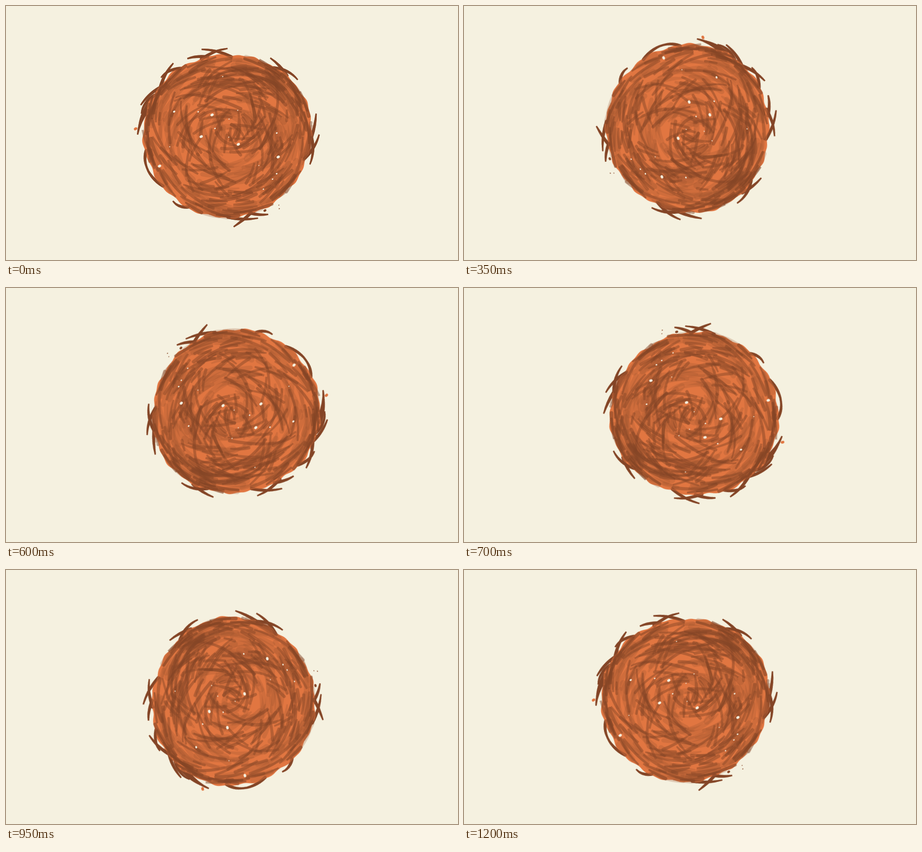
An HTML page with a canvas for the animation above (1.25 s loop, 998x561 px).

```html
<!DOCTYPE html>
<html lang="en">
<head>
<meta charset="utf-8">
<title>Rolling ball</title>
<style>
  html, body { margin: 0; width: 100%; height: 100%; overflow: hidden; background: #f5f1e0; }
  canvas { display: block; width: 998px; height: 561px; }
</style>
</head>
<body>
<canvas id="stage" width="998" height="561"></canvas>
<script>
const W = 998, H = 561, STEP = 50, STEPS = 25;
const PAPER = '#f5f1e0', ORANGE = '#e17641', BROWN = '#854627';
const { PI, sin, cos, sqrt, min, max, floor } = Math;

const stage = document.getElementById('stage').getContext('2d');
const ball = document.createElement('canvas');
ball.width = W;
ball.height = H;
const ctx = ball.getContext('2d');
ctx.translate(W / 2, H / 2);

let seed = 4127;
const rnd = () => (seed = (seed * 1664525 + 1013904223) % 4294967296) / 4294967296;
const between = (a, b) => a + (b - a) * rnd();
const polar = (r, a) => [r * cos(a), r * sin(a)];
const rad = deg => deg * PI / 180;

// Lumpy outline: a few low waves for the shape, two high ones for the ragged edge
const rim = a => 183 + 11 * cos(a - 2.69) + 3.5 * cos(2 * a + 0.4) - 2.3 * sin(3 * a)
  + 1.8 * sin(13 * a) + 1.3 * sin(29 * a + 1);

function dot([x, y], r, color) {
  ctx.fillStyle = color;
  ctx.beginPath();
  ctx.ellipse(x, y, r * 1.15, r * 0.85, -0.5, 0, 2 * PI);
  ctx.fill();
}

// A curved stroke with a round head and a thinner tail
function brush([x0, y0], [cx, cy], [x1, y1], width, tail, color) {
  const a = Math.atan2(cy - y0, cx - x0), b = Math.atan2(y1 - cy, x1 - cx);
  const m = Math.atan2(y1 - y0, x1 - x0), w = width / 2, e = tail / 2;
  const side = (x, y, dir, d) => [x - sin(dir) * d, y + cos(dir) * d];
  ctx.fillStyle = color;
  ctx.beginPath();
  ctx.arc(x0, y0, w, a + PI / 2, a - PI / 2);
  ctx.quadraticCurveTo(...side(cx, cy, m, -w), ...side(x1, y1, b, -e));
  ctx.lineTo(...side(x1, y1, b, e));
  ctx.quadraticCurveTo(...side(cx, cy, m, w), ...side(x0, y0, a, w));
  ctx.fill();
}

// Strands winding round the middle, each tilted a little off the circle
function wind({ count, width, reach, inner = 0, tilt = 0.8, color }) {
  for (let i = 0; i < count; i++) {
    const a = between(0, 2 * PI), depth = sqrt(between(inner, 1));
    const r = rim(a) * depth - 4;
    const half = min(between(...reach) / 2, r * 0.6 + 10);
    const dir = a + PI / 2 + between(-tilt, tilt) * (1.15 - depth) + (rnd() < 0.5 ? PI : 0);
    const [x, y] = polar(r, a), [dx, dy] = polar(half, dir);
    const [bx, by] = polar(half * half / (r + 25) * between(0.6, 1.1), a);
    // Shift inwards so that the ends of the bow stay on the ball
    const [mx, my] = [x - bx / 2, y - by / 2];
    brush([mx - dx, my - dy], [mx + bx, my + by], [mx + dx, my + dy],
          between(...width), between(3, 5), color);
  }
}

// Loose ends: angle of each tip, the sign tells which way the strand runs back
const tips = [1, 347, -22, 66, 73, -89, -131, 156, -160, 179, 183, 192, 197,
              218, -230, 239, 250, -267, 297, -321];
const tufts = tips.map(deg => {
  const a = rad(Math.abs(deg)), span = Math.sign(deg) * rad(between(9, 20));
  return [
    polar(rim(a + span) - 2, a + span),
    polar(rim(a + span / 2) + 11, a + span / 2),
    polar(rim(a) + between(9, 18), a)
  ];
});

function drawBall() {
  tufts.forEach(t => brush(...t, 7, 3, BROWN));
  ctx.beginPath();
  for (let deg = 0; deg < 360; deg++) ctx.lineTo(...polar(rim(rad(deg)), rad(deg)));
  ctx.fillStyle = ORANGE;
  ctx.fill();

  wind({ count: 190, width: [9, 15], reach: [30, 100], color: 'rgba(150,80,46,.25)' });
  wind({ count: 190, width: [5.5, 8], reach: [25, 85], tilt: 1.5, color: 'rgba(132,69,38,.48)' });
  wind({ count: 22, width: [6, 8], reach: [90, 160], tilt: 1.6, color: 'rgba(132,69,38,.5)' });
  wind({ count: 34, width: [5, 8], reach: [40, 90], inner: 0.92, color: 'rgba(132,69,38,.6)' });
  tufts.forEach(t => brush(...t, 7, 3, 'rgba(132,69,38,.5)'));

  // Gaps showing the paper: the clear ones, then tiny ones
  [[-160, 73], [-68, 8], [-44, -40], [14, 25], [102, 53]].forEach(p => dot(p, 3.3, PAPER));
  for (let i = 0; i < 13; i++) {
    dot(polar(170 * sqrt(rnd()), between(0, 2 * PI)), between(1, 2.4), PAPER);
  }
  // Crumbs beside the ball
  dot(polar(213, rad(182.5)), 3.5, ORANGE);
  [[186, 67, 3], [190, 57, 1], [197, 58, 1.2]].forEach(([r, deg, size]) =>
    dot(polar(r, rad(deg)), size, BROWN));
}

// Steady turning that hurries between steps 14 and 18
function turn(step) {
  const hurry = min(1, max(0, (step - 14) / 4));
  return rad(max(0, 14.1 * step - 3.5 + 20.8 * hurry));
}

const start = performance.now();
function frame() {
  const step = floor(max(0, performance.now() - start) / STEP) % STEPS;
  stage.setTransform(1, 0, 0, 1, 0, 0);
  stage.fillStyle = PAPER;
  stage.fillRect(0, 0, W, H);
  stage.translate(W / 2, H / 2);
  stage.rotate(turn(step));
  stage.drawImage(ball, -W / 2, -H / 2);
  requestAnimationFrame(frame);
}

drawBall();
frame();
</script>
</body>
</html>
```
